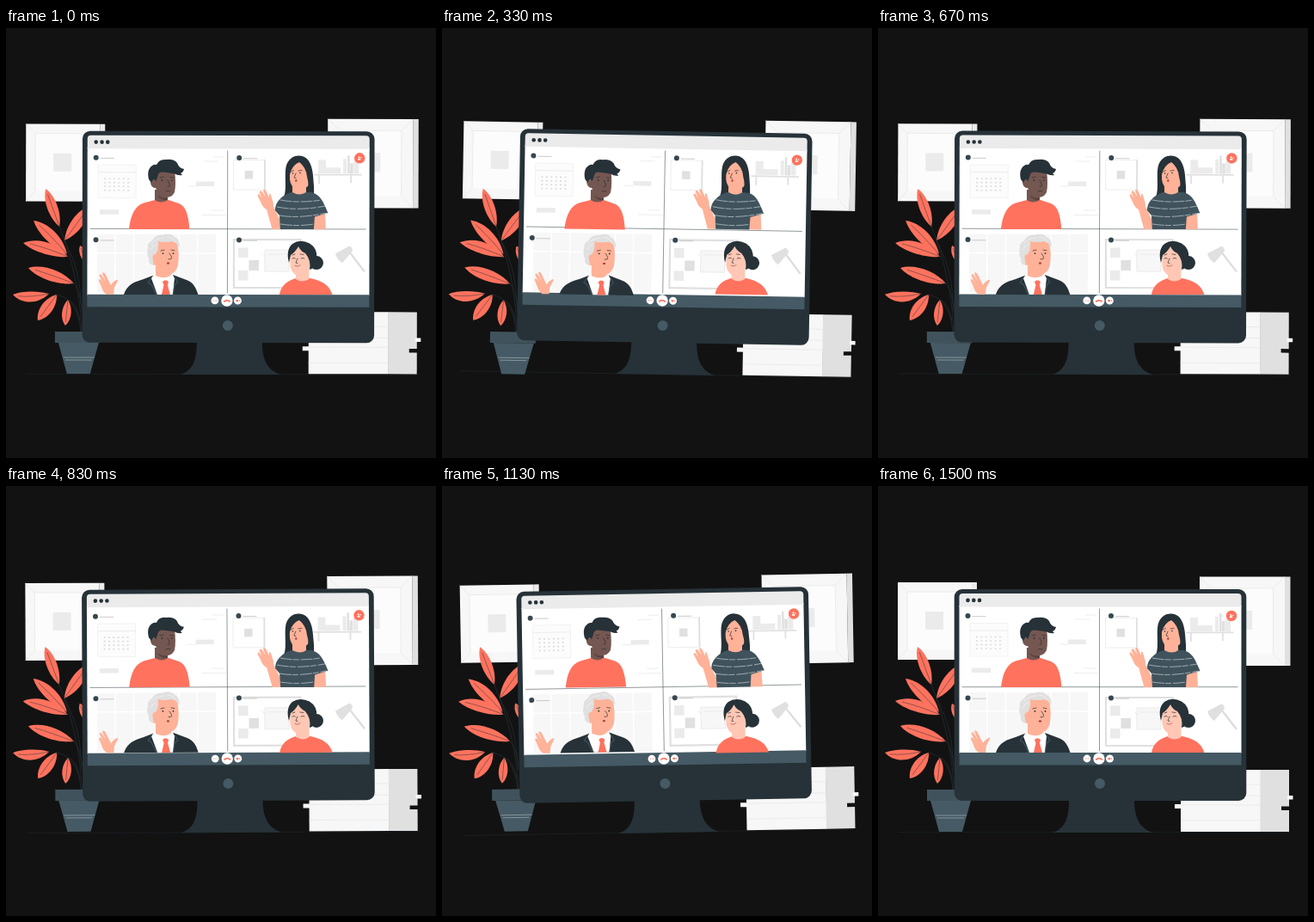
Write an HTML page that moves like this. It is 500 px wide and 500 px high and loops after 1.54 s.

```html
<!DOCTYPE html>
<html lang="en">
<head>
<meta charset="utf-8">
<title>Video call</title>
<style>
html, body { margin: 0; width: 100%; height: 100%; overflow: hidden; background: #121212; }
svg { display: block; width: 100vw; height: 100vh; }
.coral { fill: #ff725e; }
.dark { fill: #263238; }
.slate { fill: #455a64; }
.skin { fill: #ffb298; }
.pale { fill: #ffc7b4; }
.brown { fill: #755751; }
.white { fill: #fff; }
.g0 { fill: #fcfcfc; }
.g1 { fill: #f7f7f7; }
.g2 { fill: #ebebeb; }
.g3 { fill: #e0e0e0; }
.line { fill: none; stroke: #e6e6e6; stroke-width: .7; }
.ink { fill: none; stroke: #263238; stroke-width: .7; stroke-linecap: round; }
.thin { fill: none; stroke: #dfe5e8; stroke-width: .6; }
</style>
</head>
<body>
<svg viewBox="0 0 500 500">
  <!-- room -->
  <g data-pivot="250 252">
    <path class="ink" stroke-opacity=".6" d="M24 402.6H480"/>
    <path class="g2" d="M109 112h6v90h-6z"/>
    <path class="g1" d="M23 112h86v90H23z"/>
    <path class="g0" d="M34 123h64v67H34z"/>
    <path class="line" d="M23 112l11 11h64M23 202l11-12V123"/>
    <path class="g2" d="M55 146h21v21H55z"/>
    <path class="g3" d="M473 105.500h6.500v103.500h-6.500z"/>
    <path class="g1" d="M374 105.500h99V209h-99z"/>
    <path class="g0" d="M388 119h71.500v76H388z"/>
    <path class="line" d="M473 105.500L459.500 119H388l-14-13.500M473 209l-13.500-14v-76"/>
    <path class="g2" d="M412 145h23v22h-23z"/>

    <path class="g1" d="M352 330h93v72h-93zM345 370h9v5h-9z"/>
    <path class="g3" d="M444.500 330H478v72h-33.500z"/>
    <path class="g1" d="M476 360h6.500v4.500H476z"/>
    <path fill="#121212" d="M469 372.500h10v4.500h-10z"/>
    <path class="line" d="M352 347h93M352 360h93M352 371h93M352 389h93"/>
  </g>

  <!-- plant -->
  <g data-pivot="58 294">
    <path class="ink" d="M62 231C74 262 86 300 88 353M88 330C86 290 82 275 68 247M88 325Q86 303 79 297M87 353Q84 315 59 310M86 340Q82 318 72 316"/>
    <g id="leaves"></g>
    <path fill="#40535d" d="M57 353h53v13H57z"/>
    <path class="slate" d="M61 366h47l-10 36H71z"/>
    <path class="thin" stroke-opacity=".7" d="M67 383h36M69 386h31"/>
  </g>

  <!-- monitor -->
  <g data-pivot="258.500 261">
    <path class="dark" d="M222 364C222 384 219 398 203 403H320C303 398 298 384 298 364Z"/>
    <rect class="dark" x="88.700" y="120" width="339.600" height="246" rx="9"/>
    <path class="white" d="M94.500 139H422.500V311H94.500z"/>
    <path class="g2" d="M94.500 140.500V129q0-4 4-4H418.500q4 0 4 4v11.500z"/>
    <path class="slate" d="M94.500 310h328v14.500h-328z"/>
    <g class="dark"><circle cx="104.500" cy="132.900" r="2.300"/><circle cx="111.300" cy="132.900" r="2.300"/><circle cx="118" cy="132.900" r="2.300"/></g>
    <circle class="slate" cx="258" cy="346" r="6"/>

    <!-- calendar room -->
    <path class="g0" stroke="#f0f0f0" stroke-width=".8" d="M107 159.500h44V198h-44z"/>
    <path class="line" d="M107 168h44"/>
    <path fill="none" stroke="#dcdcdc" stroke-width="1.700" stroke-dasharray="2 3.400" d="M114 175.500h30M114 180h30M114 184.500h30M114 189h30"/>
    <path class="g2" d="M109 211.500h22v5.500h-22zM221 178.500h21v5.500h-21z"/>
    <path class="line" d="M241 150h13M229 155h17M211 184h10M239 212h14M228 217.500h28"/>

    <!-- shelf room -->
    <path class="line" d="M264.500 153.500h36V188h-36z"/>
    <path class="g3" d="M300 153h1.800v36H300zM277.500 166h9.500v9.500h-9.500z"/>
    <path class="g2" d="M363 153h9v16h-9zM372 162h17v7h-17zM392 152h4v17h-4zM404 154h6v15h-6z"/>
    <path class="g3" d="M397 148h2.500v21H397zM400 157h3.500v12H400zM358 169.500h55.500v1.800H358zM363 171h1.800v10H363zM400 171h1.800v9H400z"/>

    <!-- window room -->
    <path class="g1" d="M106 240h138v68H106z"/>
    <path fill="none" stroke="#fff" stroke-width="1.500" d="M127 240v68M148.500 240v68M201 240v68M222.500 240v68M106 262h138"/>

    <!-- board room -->
    <path fill="none" stroke="#e0e0e0" stroke-width="2.200" d="M265 246h77.500v56H265z"/>
    <path class="g2" d="M270 255.500h11.500V267H270zM270 282h11.500v11.500H270z"/>
    <path class="g3" d="M282.500 270H294v12h-11.500z"/>
    <path class="g1" stroke="#e6e6e6" stroke-width=".8" d="M301 258h28v25h-28z"/>
    <path class="line" d="M297 262l5 4M304 263h22"/>
    <path fill="none" stroke="#dcdcdc" stroke-width="2.200" d="M400 261L417 283"/>
    <path class="g3" d="M383 262L397 254.500Q400 252 402 255.500Q404 258 402 260L391 273Q385 269 383 262Z"/>

    <path class="ink" style="stroke-width:.5" d="M98 233.700H418M257.500 143V308"/>
    <g id="tags"></g>

    <!-- call buttons -->
    <circle class="coral" cx="411" cy="151" r="6.200"/>
    <circle class="white" cx="410.400" cy="149.900" r="1"/>
    <path class="white" d="M408.700 153.300q0-2.200 1.800-2.200t1.800 2.200z"/>
    <path class="white" d="M412.300 149.500l1.500 1-1.500 1z"/>
    <g class="white"><circle cx="243" cy="317" r="4.400"/><circle cx="257" cy="317" r="6.700"/><circle cx="269.500" cy="317" r="4.500"/></g>
    <path fill="none" stroke="#ff725e" stroke-width="1.700" stroke-linecap="round" d="M253.800 318q3.200-2.600 6.400 0"/>
    <path class="coral" d="M267.500 316h2.600v2.200h-2.600zM270.500 317l1.400-1v2.200z"/>
    <path fill="none" stroke="#ff725e" stroke-width=".8" stroke-dasharray="1 .7" d="M240.900 317h4.400"/>
  </g>

  <!-- caller in coral shirt -->
  <g data-pivot="178 193">
    <path class="coral" d="M143 234C145 217 150 207 160 203.500L173 200L189 200L201 204C209 207 212 217 213.500 234Z"/>
    <path class="brown" d="M173 188h15v12q-7 5-15 0z"/>
    <path fill="#5a423e" d="M176 194q6 5 12 3v3q-8 1-12-6z"/>
    <path class="brown" d="M174 165L196 165Q198 182 196 191Q193 197 187 197Q177 195 174 186Q169 186 168 180Q169 175 173 177Z"/>
    <path class="dark" d="M169 180L166 176Q164 168 167 163Q171 158 175 159Q178 152 186 153Q195 152 199 157Q201 163 207 164Q206 168 203 169L205 171Q200 172 196 169.500Q188 168 181 167.500Q177 168 176.500 172L174.500 178Q171 174 169 180Z"/>
    <path class="ink" d="M179 174l4-1M191 173.500l4 .5M188 177q3 5 2 7l-2 .3M186 190q3-2 5 0"/>
    <g class="dark"><circle cx="181.500" cy="177" r=".9"/><circle cx="193" cy="177" r=".9"/></g>
  </g>

  <!-- caller in striped shirt -->
  <g data-pivot="334 191">
    <path class="dark" d="M322 199C327 190 324 176 325 165C326 152 335 148 341 148.500C353 149 357 162 357.500 178Q359 192 357 200Z"/>
    <path class="skin" d="M357 216L371 214L372 234H356z"/>
    <path class="skin" d="M302 207L309 203L320 226V234H309.500Z"/>
    <path class="skin" d="M303 211Q298 208 296.500 203L292.500 195Q292.500 192 295 194L298 198L294.500 191Q295.500 188 298 190.500L301.500 196L299 189Q300.500 186.500 302.500 189.500L306 197L306 193Q308 192 308.500 196L311 204L310 211Z"/>
    <path fill="#40535d" d="M316 202C322 194 329 191 336 190.500H352C364 192 368 199 374.500 215L359 219.500L358 234H319L318 218L313 212Q313 206 316 202Z"/>
    <path class="thin" d="M319 200q20 4 48 0M315 208q24 5 56-1M318 218q22 4 55-3M319 228q20 3 39 0" stroke-dasharray="14 1 7 2"/>
    <path class="skin" d="M333 180h16v11q-7 5-16 0z"/>
    <path class="skin" d="M330 164Q333 156 341 155Q350 157 353 168Q354 178 351 184Q346 188.500 339 187.500Q331 186 330 176Z"/>
    <path class="dark" d="M328 172Q327 156 339 152Q353 152 355.500 176L357 191L350 191Q353 183 350 173Q349 162 341 156Q333 159 330 170Z"/>
    <path class="ink" d="M331.500 167l3-1.500M340 166l4-.5M337 169l-2 5 2 .6"/>
    <g class="dark"><circle cx="333.500" cy="169" r=".8"/><circle cx="342" cy="168.500" r=".8"/></g>
    <ellipse fill="#b54c42" cx="337.300" cy="177.500" rx="1.200" ry="1.500"/>
  </g>

  <!-- caller in suit -->
  <g data-pivot="166 275">
    <path class="skin" d="M117 310Q112 306 111 301L108 294Q108 291 110.500 293L113.500 298L108.500 288Q109 285 111.500 287.500L116 295L112 285.500Q113 283 115.500 286L119.500 294L122 299Q125 294 129.500 292.500Q131 293 129 296L126 302L125 310Z"/>
    <path class="dark" d="M137 310C141 298 150 295 160 292L173 287H194L210 293C218 296 221 302 223.500 310Z"/>
    <path class="white" d="M173 285L169 291L176 310H194L196 291L193 285Z"/>
    <path class="coral" d="M182 295Q185.500 291.500 189 295L188 299L191 310H181L183.500 299Z"/>
    <path class="ink" style="stroke:#546e7a" d="M169 291l-4 5 4 2 6 12M196 290l4 6-4 3-2 11"/>
    <path class="skin" d="M174 277h18v10q-7 6-18 1z"/>
    <path class="skin" d="M173 250Q184 243 199 250Q202 262 200 276Q197 287 187 287Q176 286 174 276Q168 276 167 269Z"/>
    <path fill="#e0e0e0" d="M172 276Q165 275 166 268Q163 262 165 256Q164 250 170 247Q173 240 183 240.500Q191 237.500 196 243Q203 246 201.500 256Q199 250 194 248Q184 250 177 248Q178 258 174 263Q169 263 171 270Z"/>
    <path class="line" style="stroke:#f5f5f5" d="M169 251q6-7 15-7M168 258q3-5 7-7M187 243q7 0 10 6"/>
    <path class="ink" d="M180 259l4-1M192 258l4 .7M190 262q4 5 2 6.500l-3 .2"/>
    <g class="dark"><circle cx="182.500" cy="262" r=".9"/><circle cx="194.500" cy="262" r=".9"/></g>
    <ellipse fill="#a9483e" cx="188.500" cy="273.500" rx="1.700" ry="1.200"/>
  </g>

  <!-- caller with bun -->
  <g data-pivot="348 279">
    <circle class="dark" cx="361" cy="273" r="8"/>
    <path class="coral" d="M318 310C320 299 327 294 337 291H354C368 294 376 299 379.500 310Z"/>
    <path class="pale" d="M337 281h15.500v11q-8 5-15.500 0z"/>
    <path class="pale" d="M330 261Q336 252 344 254Q353 260 355 270L353 280Q348 290 340 288.500Q332 286 330.500 277Z"/>
    <path class="dark" d="M329 273Q325 258 333 251Q342 245 353 250.500Q362 256 361.500 268Q359 280 353 281Q355 270 348 262Q342 259 340 254Q336 261 331 264Z"/>
    <path class="ink" d="M333 264l3-1M342 263l4 .5M333 268q2-1.500 3.500 0M343 268q2-1.500 4 0M339 268l-2 5 2 .5"/>
    <path class="ink" style="stroke:#b54c42" d="M336 276.500q3 2 6-.8"/>
  </g>
</svg>
<script>
const $ = id => document.getElementById(id);

// tip x, tip y, base x, base y, half width, bend
const leaves = [
  [46, 187, 62, 231, 8, 0], [97, 207, 68, 247, 9, 0], [32, 224, 71, 263, 9, .2],
  [20, 250, 72, 266, 9, .3], [26, 279, 79, 297, 9, .1], [8, 310, 50, 309, 8, -.5],
  [37, 340, 59, 310, 9, 0], [69, 346, 72, 316, 7, 0], [86, 253, 94, 274, 5, 0]
];

function leaf([x, y, bx, by, w, bend]) {
  const len = Math.hypot(x - bx, y - by);
  const nx = (by - y) / len * w, ny = (x - bx) / len * w;
  const at = (k, s) => `${bx + (x - bx) * k + nx * s},${by + (y - by) * k + ny * s}`;
  const up = bend + 1, down = bend - 1;
  return `<path class="coral" d="M${bx},${by}C${at(.3, up)} ${at(.75, up)} ${x},${y}C${at(.75, down)} ${at(.3, down)} ${bx},${by}"/>` +
    `<path class="ink" stroke-opacity=".7" d="M${bx},${by}Q${at(.5, bend)} ${at(.85, bend / 2)}"/>`;
}

function tag([x, y]) {
  return `<circle fill="#37474f" cx="${x}" cy="${y}" r="3"/>` +
    `<path class="line" style="stroke:#b5b5b5" d="M${x + 5} ${y + .7}h16"/>`;
}

$('leaves').innerHTML = leaves.map(leaf).join('');
$('tags').innerHTML = [[104.5, 151], [271, 151], [104.5, 246.5], [271, 246.5]].map(tag).join('');

// Each group sways one degree either way about its own centre, at 24 steps a second.
const LOOP = 1540, STEPS = 37;
const groups = [...document.querySelectorAll('[data-pivot]')];

function sway(p) {
  if (p < .25) return p * 4;
  return p < .75 ? 2 - p * 4 : p * 4 - 4;
}

function draw() {
  const t = performance.now() % LOOP;
  const step = Math.min(STEPS - 1, Math.floor((t + 4) * .024));
  const angle = sway((step + 1) / STEPS % 1);
  for (const g of groups) g.setAttribute('transform', `rotate(${angle} ${g.dataset.pivot})`);
  requestAnimationFrame(draw);
}
draw();
</script>
</body>
</html>
```
